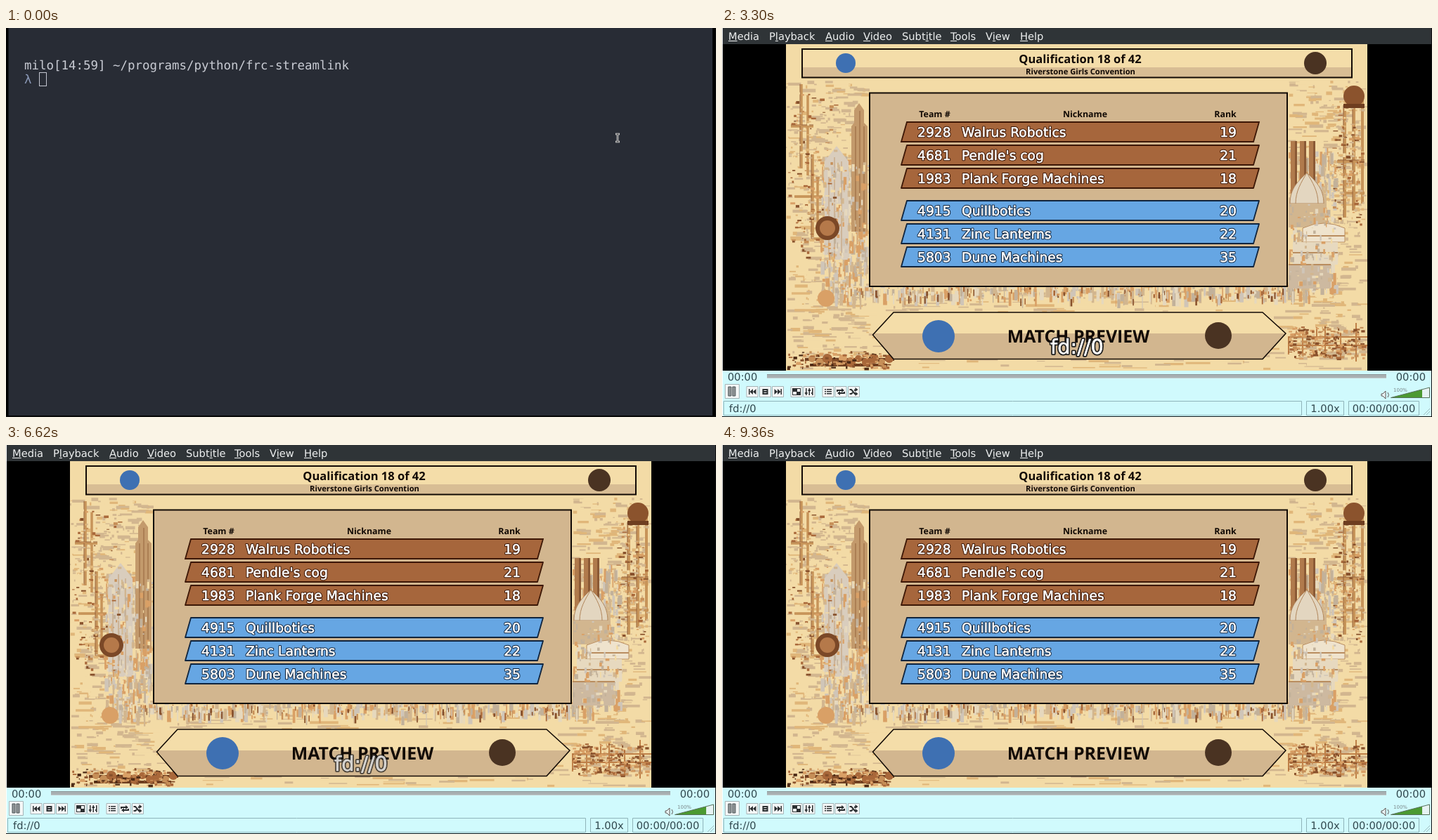
Write an HTML page with a canvas that moves like this. It is 1010x554 px and loops after 9400 ms.

```html
<!DOCTYPE html>
<html lang="en">
<head>
<meta charset="utf-8">
<title>Terminal to video stream</title>
<style>
html, body { margin: 0; width: 100%; height: 100%; overflow: hidden; background: #000; }
canvas { display: block; }
</style>
</head>
<body>
<canvas id="stage" width="1010" height="554"></canvas>
<script>
const LOOP = 9400, FOCUS = 40, PLAYER = 2710, PLAYING = 2900;
const FADE_FROM = 6300, FADE_TO = 7550;
const MONO = '17.45px "DejaVu Sans Mono", monospace';
const UI = '14.67px "DejaVu Sans", sans-serif';
const ROW = '18.7px "DejaVu Sans", sans-serif';
const bold = size => `bold ${size}px "Open Sans", "Noto Sans", sans-serif`;

const stage = document.getElementById('stage').getContext('2d');
let ctx = stage;

function rect(x, y, w, h, color) {
  ctx.fillStyle = color;
  ctx.fillRect(x, y, w, h);
}
function frame(x, y, w, h, color, width = 1) {
  ctx.strokeStyle = color;
  ctx.lineWidth = width;
  ctx.strokeRect(x, y, w, h);
}
function text(str, x, y, font, color, align = 'left') {
  ctx.font = font;
  ctx.fillStyle = color;
  ctx.textAlign = align;
  ctx.fillText(str, x, y);
}
function outlined(str, x, y, font, dark, width, align = 'left') {
  ctx.font = font;
  ctx.textAlign = align;
  ctx.lineJoin = 'round';
  for (const [color, w] of [[dark, width], ['#fff', .6]]) {
    ctx.strokeStyle = color;
    ctx.lineWidth = w;
    ctx.strokeText(str, x, y);
  }
  text(str, x, y, font, '#fff', align);
}
function shape(d, fill, stroke, width = 1) {
  const path = new Path2D(d);
  if (fill) { ctx.fillStyle = fill; ctx.fill(path, 'evenodd'); }
  if (stroke) { ctx.strokeStyle = stroke; ctx.lineWidth = width; ctx.stroke(path); }
}
function disc(x, y, r, color) {
  ctx.fillStyle = color;
  ctx.beginPath();
  ctx.arc(x, y, r, 0, 7);
  ctx.fill();
}

// ---------- terminal ----------
const COMMAND = 'python3 frcstreamlink.py';
const EVENTS = `cacc Capital City Classic
cttd Cowtown Throwdown
gagr Georgia Robotics Invitational Tournament & Showcase
ncth2 THOR @ Raleigh
nmrcc Northern Minnesota Robotics Conference Tournament
nyrr Rah Cha Cha Ruckus
onsi Southwest International
pagp GirlPOWER
wagg Washington Girls Generation
wmri West Michigan Robotics Invitational`.split('\n').map((line, i) => {
  const [code, ...name] = line.split(' ');
  return `${i + 1}`.padStart(2) + '. ' + `2017${code}`.padEnd(11) + '- ' + name.join(' ') + '\n';
}).join('');
const OUTPUT = [
  [710, '\n'],
  [1290, EVENTS + 'Select an event (ex: 1):\n'],
  [1650, '9'],
  [1750, '\n'],
  [1850, 'Select a stream quality:\n'],
  [1940, 'audio_only 160p 360p 480p 720p_alt 720p worst best\n'],
  [2100, 'b'], [2130, 'e'], [2160, 's'], [2190, 't'], [2320, '\n'],
  [2440, '[cli][info] Found matching plugin twitch for URL https://twitch.tv/wagglestream\n'],
  [2560, '[cli][info] Available streams: audio_only, 160p (worst), 360p, 480p, 720p_alt, 720p (best)\n' +
    '[cli][info] Opening stream: 720p (hls)\n[cli][info] Starting player: vlc\n\n\n']
];

function terminal(t) {
  const focused = t >= FOCUS;
  rect(0, 0, 1010, 554, focused ? '#fff' : '#000');
  rect(3.5, 0, 1001.5, 552, '#282c35');
  const steps = Math.max(0, Math.min(8, Math.floor((t - FOCUS) / 61)));
  let log = 'milo[14:59] ~/programs/python/frc-streamlink\n  ' + COMMAND.slice(0, steps * 3);
  for (const [at, str] of OUTPUT) if (t >= at) log += str;

  const lines = log.split('\n'), top = row => 42.7 + row * 20.33;
  lines.forEach((line, row) => text(line, 26, top(row) + 16.2, MONO, '#c9ccd4'));
  text('λ', 26, top(1) + 16.2, MONO, '#8c9ab8');

  const last = lines.length - 1, x = 26 + lines[last].length * 10.5;
  if (focused) rect(x, top(last), 10.5, 20.3, '#c3c6d0');
  else {
    frame(47.5, 63.5, 10, 19, '#c3c6d0');
    shape('M867 151h6M870 151v11M867 162h6', null, '#fff', 2.6);
    shape('M867.5 151h5M870 151v11M867.5 162h5', null, '#222');
  }
}

// ---------- streamed picture ----------
const TEAMS = [
  ['2928', 'Walrus Robotics', 19], ['4681', "Pendle's cog", 21], ['1983', 'Plank Forge Machines', 18],
  ['4915', 'Quillbotics', 20], ['4131', 'Zinc Lanterns', 22], ['5803', 'Dune Machines', 35]
];

function backdrop() {
  let seed = 11;
  const rnd = () => (seed = seed * 16807 % 2147483647) / 2147483647;
  const pick = list => list[Math.floor(rnd() * list.length)];
  const scatter = (count, x, y, w, h, maxW, maxH, colors) => {
    for (let i = 0; i < count; i++)
      rect(x + rnd() * w, y + rnd() * h, 1 + rnd() * maxW, 1 + rnd() * maxH, pick(colors));
  };
  const TAN = ['#d2b68f', '#d2b68f', '#e0b679', '#f3dba6'];
  const BROWN = ['#a9683a', '#c68f58', '#87502b', '#d9a066'];
  const STONE = ['#cfc5b8', '#c2b19a', '#d2b68f', '#d9a066', '#e6d8bd', '#f3dba6'];

  rect(91, 23, 827, 465, '#f3dba6');
  scatter(500, 91, 75, 112, 395, 20, 4, TAN);
  scatter(500, 804, 75, 104, 395, 20, 4, TAN);
  scatter(350, 91, 368, 810, 116, 40, 3, TAN);

  // side buildings and skyline
  scatter(420, 140, 180, 66, 200, 5, 20, STONE);
  scatter(380, 806, 170, 66, 205, 5, 20, STONE);
  scatter(420, 150, 366, 690, 14, 5, 20, STONE);
  scatter(130, 180, 368, 640, 18, 2, 10, BROWN);
  shape('M184 290V140l4-5v-18l7-10 7 10v18l5 5v150z', '#c39a6c');
  shape('M190 290V140M196 290V118M202 290V140', null, '#94653d');
  shape('M146 330V190l17-22 17 22V330z', '#d9cdbd');
  shape('M152 325V200M160 325V184M170 325V190', null, '#c09a72');
  scatter(160, 144, 190, 58, 150, 4, 10, STONE);
  for (const x of [809, 822, 835]) {
    rect(x, 161, 9, 75, '#b07a4c');
    rect(x + 6, 161, 3, 75, '#8a5935');
  }
  shape('M808 250c0-22 12-32 24-44 12 12 24 22 24 44z', '#e3d6c0', '#b0855a');
  shape('M816 250c0-18 8-30 16-44 8 14 16 26 16 44M832 206v-20', null, '#b0855a');
  rect(806, 250, 54, 34, '#d2b68f');
  shape('M826 285q30-14 60 0v20h-60z', '#efe3cd', '#b98d5f');
  rect(812, 305, 64, 32, '#e7d9bf');
  rect(806, 337, 60, 34, '#cdb9a0');
  shape('M806 337h60M812 320h64M826 296h60', null, '#b98d5f', 2);
  scatter(120, 806, 250, 64, 118, 5, 8, STONE);

  // pipework
  shape('M113 80V200M122 95V210M129 180V300h22M103 240h40M98 140h32M136 215v70', null, '#c79459', 3.5);
  shape('M111 80V200M127 180V300M98 138h32', null, '#94603a');
  scatter(220, 94, 90, 66, 240, 6, 3, BROWN.concat(TAN));
  disc(150, 285, 17, '#7b4827');
  disc(150, 285, 11, '#b5794a');
  disc(148, 385, 12, '#d9a066');
  shape('M886 110V270M899 110V260M911 100V250M875 190h38M880 235h34', null, '#c79459', 4);
  shape('M884 110V270M897 110V260M876 188h38', null, '#94603a');
  scatter(220, 868, 100, 43, 180, 6, 3, BROWN.concat(TAN));
  disc(899, 97, 15, '#8b532d');
  rect(884, 108, 30, 6, '#6e3e20');
  shape('M806 465V440h40v-14M826 465V430M858 470V424M880 470V434M902 475V420M806 452h112M840 440h78', null, '#bf8048', 2);
  scatter(260, 804, 425, 107, 45, 6, 3, BROWN);
  shape('M118 472H245M125 480H235', null, '#6e3e20', 4);
  for (let i = 0; i < 11; i++) disc(128 + i * 11, 471 + i % 2 * 5, 5 + i % 3, pick(BROWN));
  scatter(140, 92, 460, 145, 24, 6, 3, BROWN.concat('#4d2b16'));
}

function board() {
  backdrop();
  const INK = '#120a05', BLUE = '#3e70b2', DARK = '#4a3322';
  rect(114, 30, 782, 41, '#f4dda9');
  rect(114, 56, 782, 15, '#d8bd94');
  frame(114, 30, 782, 40.5, INK, 2);
  text('Qualification 18 of 42', 509.5, 50, bold(16.5), INK, 'center');
  text('Riverstone Girls Convention', 510, 66, bold(11.2), INK, 'center');
  disc(176, 50, 14, BLUE);
  disc(844, 50, 16, DARK);

  rect(210, 93, 594, 275, '#d2b68f');
  frame(210, 92.5, 594, 275.5, INK, 2);
  text('Team #', 302.5, 127, bold(12.4), INK, 'center');
  text('Nickname', 516.5, 127, bold(12.4), INK, 'center');
  text('Rank', 716, 127, bold(12.4), INK, 'center');
  TEAMS.forEach(([number, name, rank], i) => {
    const red = i < 3, y = 134 + i * 33 + (red ? 0 : 13), edge = red ? '#3c1706' : '#10243d';
    shape(`M263 ${y}H764L756 ${y + 28}H255z`, red ? '#a6663c' : '#66a6e3', edge, 1.8);
    outlined(number, 278, y + 20.5, ROW, edge, 2.6);
    outlined(name, 341, y + 20.5, ROW, edge, 2.6);
    outlined(`${rank}`, 732, y + 20.5, ROW, edge, 2.6, 'right');
  });

  const banner = 'M214.5 437L244 405H769L802 435 769 471.5H244z';
  shape(banner, '#f4dda9');
  shape('M215 435H802L769 471.5H244z', '#d2b68f');
  shape(banner, null, INK, 1.6);
  text('MATCH PREVIEW', 507, 448, bold(24.9), INK, 'center');
  disc(308, 439, 23, BLUE);
  disc(706, 438, 19, DARK);
}

const boardCanvas = document.createElement('canvas');
boardCanvas.width = 1010;
boardCanvas.height = 554;
ctx = boardCanvas.getContext('2d');
ctx.textRendering = 'geometricPrecision';
board();
ctx = stage;

// ---------- media player ----------
const MENU = [
  ['Media', 9, 0], ['Playback', 67, 1], ['Audio', 147, 0], ['Video', 201, 0],
  ['Subtitle', 256, 4], ['Tools', 325, 0], ['View', 375, 1], ['Help', 424, 0]
];
const BUTTONS = [
  [34.5, 'M3 4h1.5v8H3zM9 4v8L4.5 8zM13.5 4v8L9 8z'],
  [53, 'M4 4h8v8H4zM6 6h4v1H6zM6 9h4v1H6z'],
  [71, 'M3 4l4.5 4L3 12zM7.5 4l4.5 4-4.5 4zM12 4h1.5v8H12z'],
  [97.5, 'M2 3h12v10H2zM9 4h4v4H9zM3 8h5v4H3z'],
  [115.5, 'M3 3h1.5v10H3zM7.5 3H9v10H7.5zM12 3h1.5v10H12zM2 9h1v2H2zM4.5 9h1v2h-1zM6.5 5h1v2h-1zM9 5h1v2H9zM11 9h1v2h-1z'],
  [142.5, 'M3 4h2v1.5H3zM6 4h7v1.5H6zM3 7h2v1.5H3zM6 7h7v1.5H6zM3 10h2v1.5H3zM6 10h7v1.5H6z'],
  [160.5, 'M2 8V5h7V3l4 3-4 3V7H4v1zM14 8v3H7v2l-4-3 4-3v2h5V8z'],
  [179, 'M2 4h3l5 6V8l4 3-4 3v-2H9L4 6H2zM2 12h3l2-2-1-1.5L4 10H2zM8 6l1-1.5h1V2l4 3-4 3V6.5L9 7z']
];

function button(x, y, w, h, fill = '#f4f7f7') {
  rect(x, y, w, h, fill);
  frame(x + .5, y + .5, w - 1, h - 1, '#a3b4b7');
}

function controls(playing) {
  const INK = '#30474d', BAR = '#d0fafd';
  rect(1, 488, 1008, 65, BAR);

  const [left, right] = playing ? [64, 945] : [57, 952], clock = playing ? '00:00' : '--:--';
  text(clock, playing ? 8 : 12, 502, UI, INK);
  text(clock, playing ? 1001 : 997, 502, UI, INK, 'right');
  rect(left, 493, right - left, 6, '#a8b0b2');
  rect(left, 493, right - left, 1, '#8b9698');
  rect(left, 498, right - left, 1, '#c3cccd');

  button(4, 507, 21, 21);
  shape(playing ? 'M9 511h4v13h-4zM15 511h4v13h-4z' : 'M9 511l11 6.5-11 6.5z', '#909698', '#4d5557');
  BUTTONS.forEach(([x, icon], i) => {
    button(x, 510, 17, 16, i === 3 && !playing ? '#8fa9c8' : undefined);
    ctx.save();
    ctx.translate(x + .5, 510);
    shape(icon, '#2b2f31');
    ctx.restore();
  });

  shape('M938 521h2l4-4v11l-4-4h-2z', '#e9f4f5', '#5e5553');
  if (playing) shape('M947 519q3 3.5 0 7', null, '#5e5553');
  shape('M951.5 526.5L1006.5 512v14.5z', '#e6f3f3');
  if (playing) shape('M951.5 526.5L996 514.8v11.7z', '#4b9a31');
  shape('M951.5 526.5L1006.5 512v14.5z', null, playing ? '#56705a' : '#8d6f68');
  text(playing ? '100%' : '0%', playing ? 955 : 963, 517.5, '7px "DejaVu Sans", sans-serif', '#7d8a8c');

  const field = (x, end, str, align) => {
    frame(x + .5, 531.5, end - x - 1, 20, '#8fb4b9');
    text(str, align ? (x + end) / 2 : x + 8, 546.5, UI, INK, align);
  };
  field(2, playing ? 825 : 848, 'fd://0');
  field(playing ? 831 : 855, playing ? 885 : 908, '1.00x', 'center');
  field(playing ? 891 : 914, 992, `${clock}/${clock}`, 'center');
  shape('M998 551l9-9M1002 551l5-5', null, '#9dbcc0');
}

function player(t) {
  const playing = t >= PLAYING;
  rect(0, 0, 1010, 554, '#fff');
  rect(1, 0, 1008, 553, '#000');
  rect(1, 0, 1008, 23, '#2f3437');
  for (const [label, x, key] of MENU) {
    text(label, x, 17, UI, '#eef0f0');
    const before = ctx.measureText(label.slice(0, key)).width;
    rect(x + before, 18, ctx.measureText(label[key]).width, 1, '#eef0f0');
  }
  if (playing) {
    ctx.drawImage(boardCanvas, 91, 23, 827, 465, 91, 23, 827, 465);
    ctx.globalAlpha = Math.max(0, Math.min(1, (FADE_TO - t) / (FADE_TO - FADE_FROM)));
    outlined('fd://0', 505, 464, '28.8px "DejaVu Sans", sans-serif', '#1c1c1c', 4, 'center');
  } else {
    ctx.globalAlpha = .12 + Math.max(0, t - 2760) / 1000;
    rect(467, 218, 76, 76, '#e65a00');
  }
  ctx.globalAlpha = 1;
  controls(playing);
}

ctx.textRendering = 'geometricPrecision';
const start = performance.now();
function draw() {
  const t = (performance.now() - start) % LOOP;
  if (t < PLAYER) terminal(t);
  else player(t);
  rect(1009, 0, 1, 554, '#111');
  rect(0, 553, 1010, 1, '#111');
  requestAnimationFrame(draw);
}
draw();
</script>
</body>
</html>
```
